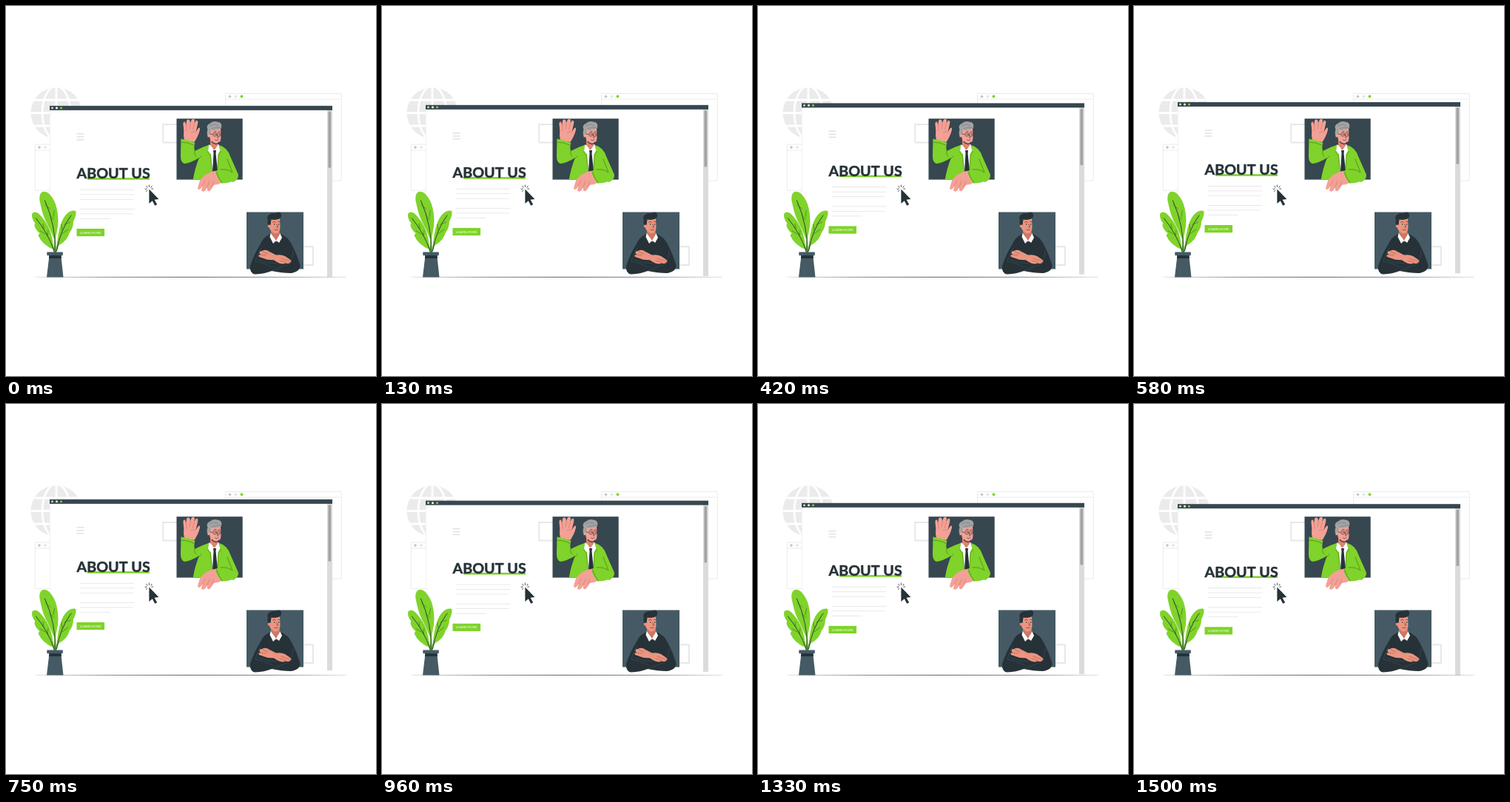
An HTML page with a canvas that plays this animation: 500 by 500 pixels, repeating every 1540 ms.

```html
<!DOCTYPE html>
<html lang="en">
<head>
<meta charset="utf-8">
<title>About us</title>
<style>
  html, body { margin: 0; width: 100%; height: 100%; overflow: hidden; background: #fff; }
  canvas { display: block; width: 500px; height: 500px; }
</style>
</head>
<body>
<canvas id="stage" width="500" height="500"></canvas>
<script>
const ctx = document.getElementById('stage').getContext('2d');

const GREEN = '#7fd32a', INK = '#263238', SLATE = '#37474f', STEEL = '#455a64';
const PALE = '#ebebeb', GREY = '#c4c4c4', SKIN = '#f3a196', TAN = '#eb9580';
const LOOP = 1540, FPS = 24, LIFT = 6.5, PHASE = 40;

function rect(x, y, w, h, color) {
  ctx.fillStyle = color;
  ctx.fillRect(x, y, w, h);
}

function fill(path, color) {
  ctx.fillStyle = color;
  ctx.fill(new Path2D(path));
}

function line(path, color, width = 1) {
  ctx.strokeStyle = color;
  ctx.lineWidth = width;
  ctx.stroke(new Path2D(path));
}

function frame(x, y, w, h, color, width) {
  ctx.strokeStyle = color;
  ctx.lineWidth = width;
  ctx.strokeRect(x, y, w, h);
}

function ellipse(x, y, rx, ry = rx) {
  ctx.beginPath();
  ctx.ellipse(x, y, rx, ry, 0, 0, Math.PI * 2);
}

function dot(x, y, r, color) {
  ellipse(x, y, r);
  ctx.fillStyle = color;
  ctx.fill();
}

// A thin outline of the same colour thickens the letters.
function text(str, x, y, font, color, weight) {
  ctx.font = font;
  ctx.fillStyle = ctx.strokeStyle = color;
  ctx.fillText(str, x, y);
  if (weight) {
    ctx.lineWidth = weight;
    ctx.strokeText(str, x, y);
  }
}

function drawGlobe() {
  ctx.save();
  dot(68, 144.5, 34.5, PALE);
  ctx.clip();
  ctx.strokeStyle = '#fff';
  ctx.lineWidth = 2.8;
  ellipse(68, 144.5, 19, 36);
  ctx.stroke();
  line('M68 108V181M30 144.5H106M36 127H100M36 162H100', '#fff', 2.8);
  ctx.restore();
}

function drawBackWindows() {
  frame(297, 118.5, 156.3, 117.5, PALE, 1);
  line('M297 126H453', PALE);
  dot(302.5, 122.2, 1.8, GREY);
  dot(310.5, 122.2, 1.8, '#e2e2e2');
  dot(318.5, 122.2, 1.9, GREEN);
  frame(39.7, 187, 80, 62.3, PALE, 1);
  line('M40 195H110', PALE);
  dot(45, 191, 1.8, GREY);
  dot(53, 191, 1.8, '#e2e2e2');
}

function drawWindow() {
  rect(59, 136, 382, 230.5, '#fff');
  line('M59.4 136V366', '#efefef', 0.8);
  rect(434, 140, 7, 226.5, '#dbdbdb');
  ctx.fillStyle = '#a3a3a3';
  ctx.beginPath();
  ctx.roundRect(435.5, 142.5, 3.7, 76.5, 1.5);
  ctx.fill();
  rect(59, 135.2, 382, 6, SLATE);
  dot(62.5, 138.2, 1.4, '#d5e8c0');
  dot(68.5, 138.2, 1.5, '#fff');
  dot(74.5, 138.2, 1.5, GREEN);

  for (const y of [173.2, 177.2, 181.2]) rect(95.5, y - 0.7, 10, 1.3, '#dedede');

  rect(110, 232.5, 84, 2.6, GREEN);
  text('ABOUT US', 95.5, 233.5, '700 19.7px Lato, sans-serif', INK, 0.5);

  const widths = [74, 74, 72, 74, 72, 41];
  widths.forEach((w, i) => rect(99.5, 248.2 + i * 6.5 + (i > 2 ? 6.6 : 0), w, 0.8, '#e3e3e3'));

  rect(95.5, 301.3, 37.6, 10.2, GREEN);
  text('LEARN MORE', 100, 308, '4.5px Lato, sans-serif', '#fff');
}

function drawWaver() {
  frame(212.3, 160, 24, 24.5, '#e8e8e8', 2);
  rect(230.5, 152.2, 89.2, 82.4, SLATE);
  // raised arm
  fill('M241 182Q239.500 174 240.300 168L239.500 160Q239 156 242 156.500L243.300 161L244 155Q246.500 151.500 248.500 155L249 158L251 153.500Q254.500 151 255 155L254.500 159L256.500 155Q260 153.500 259.200 159L256.500 170L259.500 165.500Q262.500 163 262 167C261 173 258 178 254.500 184Z', SKIN);
  line('M243.300 161L244.500 168M249 158L248.500 166M254.500 159L252.500 167M250 171Q253 169 256.500 170', '#c97463', 0.6);
  // jacket
  fill('M236.500 179.500Q246 181 255.500 185Q253.500 191 255 196Q264 191 275 187.500L288 188Q299 191 303 203L314 228Q314 235 307 238L296 234.600H252.800Q255 220 261 205Q250 212 241 213Q236 211 236 203Z', GREEN);
  line('M237 184Q246 184 254 188M255 196Q254 201 257 203M260 207L264 203', '#477f16', 0.7);
  // shirt and tie
  fill('M276 187L287.500 187L286.500 202L285 228L279 226Z', '#fff');
  fill('M280 195L284 195L283.500 199L286 223L282.500 229L279 224L280.500 199Z', INK);
  line('M275 189L273 198L276 201L279.300 226M287.500 189L290 198L287 201L285.700 224', '#477f16', 0.6);
  fill('M274.500 187L280.500 195L276 200L273 195.500Z', '#fff');
  fill('M287 187L284 195L287 199.500L289.500 195Z', '#fff');
  // head
  fill('M276 178L276 187.500L281.500 195L286.500 188L286.500 181Z', '#df8272');
  fill('M274 164Q283 159 290 164L290.500 178Q290 186 284 186Q277.500 185 275.500 179Z', SKIN);
  line('M278.300 183.300Q281 186.700 284.500 186.300Q287 186 288 184', INK, 1.1);
  fill('M273 178Q270.500 171 272.500 167Q269.500 161 276 158.500Q280 155 285.500 156.500Q293 157 291 165Q284 169 277 167L276.500 174Z', '#a3a3a3');
  line('M275 162Q280 158.500 286.500 161M278 166Q284 163 289.500 164', '#777', 0.6);
  dot(275, 175, 2.2, SKIN);
  ctx.strokeStyle = INK;
  ctx.lineWidth = 0.6;
  for (const x of [282.3, 288]) {
    ellipse(x, 173.7, 2.5);
    ctx.stroke();
    dot(x + 0.4, 173.7, 0.7, INK);
  }
  line('M275.500 173L279.800 173.500M281 170Q283 168.500 284.500 169.800M287 169.800L289 169.500M285.300 175L286.800 178H285.300M282.500 181Q285 182.500 287 180.800', INK, 0.6);
  // resting arm
  fill('M291 222Q280 222 271 227Q263 232 261 239L259 246Q260 249.500 263 247L265.500 243L264 249.500Q266.500 252.500 270 248.500L271.500 245L272 249.500Q275 252 278 246.500L281 242Q290 241 296 236Z', SKIN);
  line('M269 236L265.500 243M275 237L271.500 245M281 237L278 244', '#c97463', 0.6);
  fill('M288 221Q299 219 306 226L300 207Q307 212 312 225Q316 232 310 235Q301 240 291 239.500Q284 230 283 224Z', GREEN);
  line('M284 224Q288 234 292 239M299 207L306 225Q300 220 290 221', '#477f16', 0.7);
}

function drawListener() {
  frame(391, 325.3, 24, 24.7, '#e8e8e8', 2);
  rect(325, 278.5, 77, 77, STEEL);
  // sweater
  fill('M357 308Q348 312 343.500 322Q335 336 330 351Q329 362 337 362.500Q349 362 359 358Q373 361 385 361Q398 359 397.500 350Q393 335 386 322Q381 312 371 308Z', INK);
  line('M345 327Q339 336 337 345Q349 347 360 353M388 331Q387 342 384 348Q374 352 359 358M341 343Q352 347 365 348', '#435159', 0.6);
  // collar and head
  fill('M358 302V310L365 319L371 310L369 302Z', '#cf7765');
  fill('M357.500 307L365 317L361 321L356.500 312Z', '#fff');
  fill('M370.500 307.500L365 317L369 320L373 313Z', '#fff');
  fill('M355.500 288Q363 284 370 287L370.500 300Q369.500 307.500 364 307.500Q358 306 356 300Z', TAN);
  fill('M354.500 297Q352.500 292 354 289Q351.500 285 356 281.500Q360 279 364 280Q370 277 372 281Q372.500 287 368 288Q362 289.500 358.500 288.500L357.500 296Z', INK);
  dot(355.8, 297.5, 2, TAN);
  dot(362.8, 295, 0.8, INK);
  dot(368.5, 295, 0.8, INK);
  line('M360.500 292Q362.500 290.500 364.500 292M367.500 291.500L369.500 291.500M366 295.500L367.500 299H365.800M363 302.300Q365.500 303.500 367.500 302', INK, 0.6);
  // folded hands
  fill('M346 331Q351 328 356 332L368 338L364 343Q354 344 348 341L342 339Q340 336 344 336L342.500 334Q342 331 346 331Z', TAN);
  fill('M363 337Q371 335 377 338L383 342Q387 345 384.500 346Q383 349 378 347.500Q372 350 366 346L360 342Z', TAN);
  line('M344 336L351 337M347 332L354 335M372 341L383 345M370 344L379 347', '#ad594d', 0.6);
}

function drawCursor() {
  ctx.save();
  ctx.translate(-0.6, -0.5);
  fill('M194 248L207 261.500L201.200 262.300L204.800 268.800L201.800 270.200L198.400 263.800L194 267.500Z', INK);
  line('M194 242.500V245M190.300 243.800L191.500 245.700M197.700 243.800L196.500 245.700M188.500 247.800H191M199.300 247.500H197.300M190 251L191.500 249.800', INK, 0.8);
  ctx.restore();
}

function drawPlant() {
  line('M65.500 334Q66 318 66.500 305M65.500 334L63 322M67 334L70 320', '#4d9c22', 1.5);
  fill('M66.300 320Q63 309 56.500 296Q50 285 47 270Q43.500 258 47 253Q52 248 59 254.500Q66 262 68.500 273Q72.500 290 68.500 306Z', GREEN);
  fill('M64.500 329Q49 323 43.500 310L45.500 307Q37 300 39 293Q33.500 286 35.500 280Q41 276 47.500 284Q59 297 62.500 314Z', GREEN);
  fill('M69 328Q69 316 71 307Q74 290 81 282Q88 275 94.500 277Q95 284 91 291Q91 300 86 306Q83 317 72 323Z', GREEN);
  line('M67 333Q67 295 52.500 263M65 331Q57 307 40.500 287M68.500 331Q73 303 88 283', INK, 0.9);
  line('M64.500 289L59 283M64 285L65.500 276M59.500 274L53.500 269M55 309L46 304M56 311L57 303M51 301L50 294M74 309L84 302M76 303L75 295M79 295L87 292', '#35661f', 0.6);
  fill('M58.500 337H74.300L77.500 366.500H55Z', STEEL);
  fill('M58.300 337H74.500L75 341H57.900Z', INK);
  rect(55.3, 332.5, 21.5, 4.6, STEEL);
}

function drawGround() {
  const shade = ctx.createLinearGradient(40, 0, 460, 0);
  const alphas = [0.15, 0.65, 0.85, 0.65, 0.15];
  alphas.forEach((a, i) => shade.addColorStop(i / 4, `rgba(38,50,56,${a})`));
  rect(40, 365.9, 420, 0.9, shade);
}

// Window rises and sinks at constant speed, sampled at 24 steps a second.
function windowOffset(ms) {
  const step = Math.min(36, Math.floor((ms % LOOP + 5) * FPS / 1000));
  const p = ((step * 1000 / FPS + PHASE) % LOOP) / LOOP;
  return -LIFT * (1 - Math.abs(1 - 2 * p));
}

function draw(ms) {
  rect(0, 0, 500, 500, '#fff');
  drawGlobe();
  drawBackWindows();
  ctx.save();
  ctx.translate(0, windowOffset(ms));
  drawWindow();
  ctx.restore();
  drawWaver();
  drawListener();
  drawCursor();
  drawGround();
  drawPlant();
}

ctx.lineCap = 'round';
ctx.lineJoin = 'round';
const start = performance.now();
function tick() {
  draw(performance.now() - start);
  requestAnimationFrame(tick);
}
tick();
</script>
</body>
</html>
```
